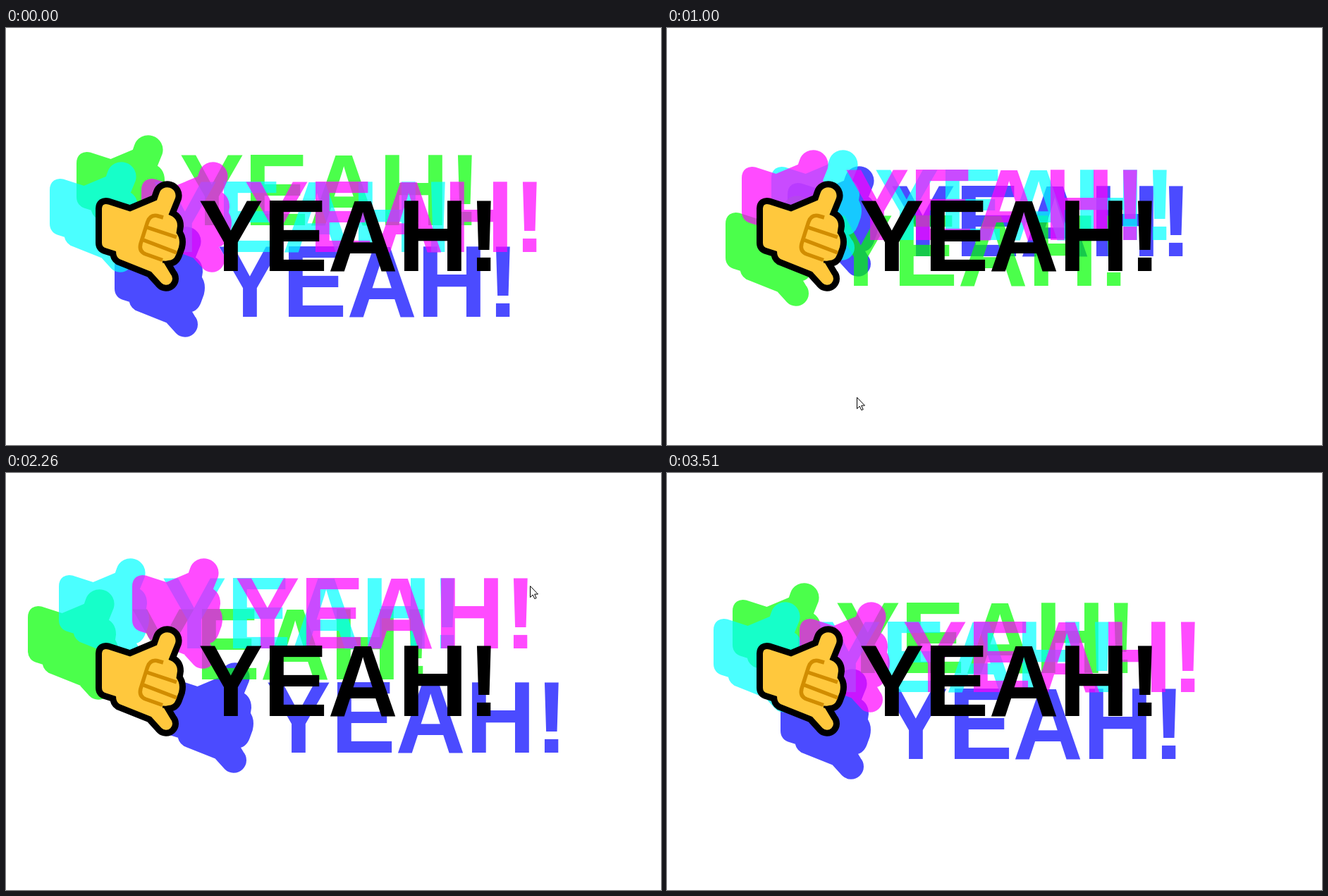
An HTML page for the animation above (3.57 s loop, 929 by 592 pixels).

```html
<!DOCTYPE html>
<html lang="en">
<head>
<meta charset="utf-8">
<title>Yeah</title>
<style>
  html, body { margin: 0; width: 100%; height: 100%; overflow: hidden; background: #fff; }
  svg { display: block; width: 929px; height: 592px; }
  text { font: bold 137.5px "Liberation Sans", Arial, sans-serif; fill: currentColor; }
  .shadow { opacity: .7; }
  #beam { mix-blend-mode: difference; }
</style>
</head>
<body>
<svg viewBox="0 0 929 592">
  <defs>
    <path id="hand" d="M136 257 Q136 248 145 250.500 L176 260.500 L214 244.500 L217.500 234.500
      A11.600 11.600 0 0 1 240 241.500 L230.500 265 Q243 269 243 281 L241.500 291
      Q248 299 245 311 L241 322 Q238 330 230 330 L223 332 L233.500 349.500
      A9 9 0 0 1 220.500 362 L206 346 L161 328 Q156 325 156 317
      L142 312.500 Q136 311 136 305 Z"/>
    <g id="shape">
      <use href="#hand" fill="currentColor" stroke="currentColor" stroke-width="18" stroke-linejoin="round"/>
      <text transform="translate(273 345) scale(1 1.046)">YEAH!</text>
    </g>
  </defs>

  <g id="shadows"></g>

  <use href="#shape" color="#000"/>
  <use href="#hand" fill="#ffc83d"/>
  <g fill="none" stroke="#d18d00" stroke-width="5.500" stroke-linejoin="round">
    <path d="M223 269 L214 266.500 Q204 265 200.500 276 L191 306 Q188 317 198 321 L222 329.500"/>
    <path d="M200 283 L242 297 M195 301 L242 319"/>
  </g>
  <path d="M222 332 L240 333" stroke="#000" stroke-width="3"/>

  <path id="arrow" d="M.5 .5 V16.500 L4.200 13 L6.800 18.500 L9.200 17.500 L6.700 12 H11.500 Z"
    fill="#fff" stroke="#000"/>
  <path id="beam" d="M-3 -7.500 H0 M1 -7.500 H4 M.5 -7 V7 M-3 7.500 H0 M1 7.500 H4" stroke="#fff"/>
</svg>

<script>
  const LOOP = 3570, STEPS = 49;

  // Turning points of the shadow's walk: step, x, y.
  const WALK = [
    [0, 65, -27], [1, 68, -43], [9, 34, -77], [14, -21, -44],
    [18, 36, -89], [21, 24, -67], [24, 34, -88], [27, 0, -60],
    [31, 52, -96], [35, 47, -74], [40, 61, -37], [48, 61, -34]
  ];

  const slope = (i, c) => (WALK[i + 1][c] - WALK[i][c]) / (WALK[i + 1][0] - WALK[i][0]);

  // Harmonic mean keeps the curve from overshooting its turning points.
  function tangent(i, c) {
    if (i === 0) return slope(0, c);
    if (i === WALK.length - 1) return slope(i - 1, c);
    const a = slope(i - 1, c), b = slope(i, c);
    return a * b <= 0 ? 0 : 2 * a * b / (a + b);
  }

  function walk(step, c) {
    let i = 0;
    while (i < WALK.length - 2 && step >= WALK[i + 1][0]) i++;
    const [from, to] = [WALK[i], WALK[i + 1]];
    const span = to[0] - from[0], u = (step - from[0]) / span, v = 1 - u;
    return Math.round(from[c] * (1 + 2 * u) * v * v + tangent(i, c) * span * u * v * v
      + to[c] * u * u * (3 - 2 * u) - tangent(i + 1, c) * span * u * u * v);
  }

  const byId = id => document.getElementById(id);
  const place = (node, x, y) => node.setAttribute("transform", `translate(${x} ${y})`);
  const show = (node, on) => node.setAttribute("visibility", on ? "visible" : "hidden");

  // Bottom to top, each with its own turn of the walk vector.
  const shadows = [
    ["#00f", (x, y) => [-y, x]],
    ["#0f0", (x, y) => [y, -x]],
    ["#0ff", (x, y) => [-x, y]],
    ["#f0f", (x, y) => [x, y]]
  ].map(([color, turn]) => {
    const node = document.createElementNS("http://www.w3.org/2000/svg", "use");
    node.setAttribute("href", "#shape");
    node.setAttribute("class", "shadow");
    node.setAttribute("color", color);
    byId("shadows").append(node);
    return { node, turn };
  });

  function render(time) {
    // Each pose is held for one step.
    const step = Math.min(STEPS - 1, Math.floor(time / LOOP * STEPS + 0.3));
    const x = walk(step, 1), y = walk(step, 2);
    for (const { node, turn } of shadows) place(node, ...turn(x, y));

    // The pointer that drives the shadows.
    const px = Math.round(405 + 6.5 * x), py = 832 + 7 * y;
    const overText = px > 115 && px < 700 && py > 200 && py < 400;
    place(byId("arrow"), px, py);
    place(byId("beam"), px, py);
    show(byId("arrow"), !overText);
    show(byId("beam"), overText);
  }

  const start = performance.now();
  function loop() {
    render((performance.now() - start) % LOOP);
    requestAnimationFrame(loop);
  }
  loop();
</script>
</body>
</html>
```
